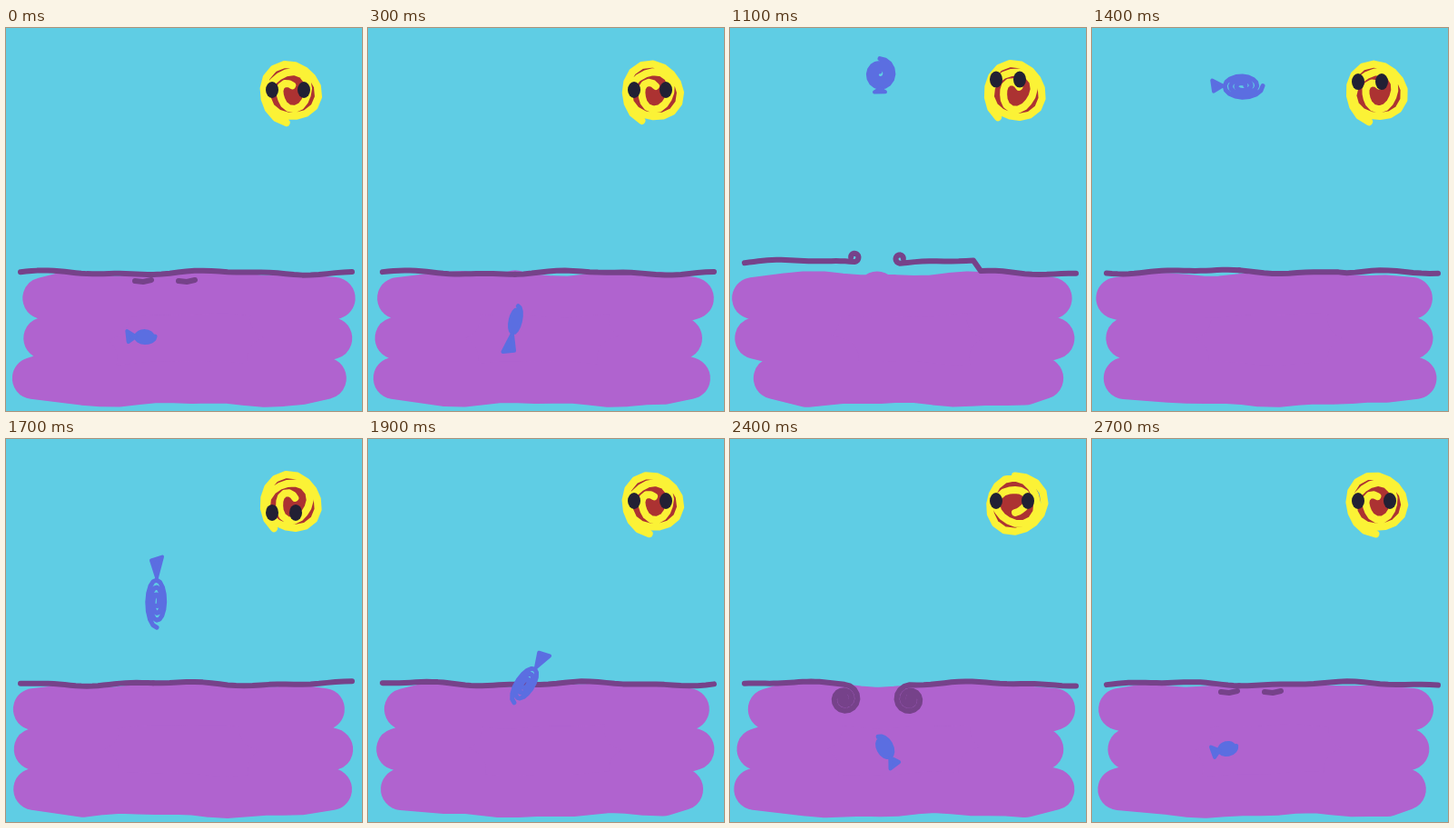
An HTML page with a canvas that plays this animation: 392 by 421 pixels, repeating every 2800 ms.

```html
<!DOCTYPE html>
<html>
<head>
<meta charset="utf-8">
<style>
  html, body { margin: 0; height: 100%; overflow: hidden; background: #5fcde4; }
  canvas { display: block; }
</style>
</head>
<body>
<canvas id="stage" width="392" height="421"></canvas>
<script>
const ctx = document.getElementById('stage').getContext('2d');
const SKY = '#5fcde4', SEA = '#b063cf', WAVE = '#76428a', FISH = '#5b6ee1';
const YELLOW = '#fbf236', RED = '#ac3232', EYE = '#222034';
const STEP = 100, STEPS = 28, TURN = Math.PI * 2;
const LEAP_OUT = 7, APEX = 12, SPLASH_X = 162, WATER = 269;

// Fish: step, x, heading in degrees, half length, half width
const swim = [
  [0, 153, 0, 13, 9], [3, 162, -78, 18, 8], [7, 170, -90, 21, 10], [11, 165, -90, 19, 18],
  [17, 166, 90, 30, 13], [22, 184, 170, 18, 11], [27, 149, 345, 12, 9], [28, 153, 360, 13, 9]
];

const rand = seed => Math.abs(Math.sin(seed * 12.9898 + 4.1) * 43758.5453) % 1;
const bell = (x, center, spread) => Math.exp(-(((x - center) / spread) ** 2));

// Uneven hand-drawn height along x, redrawn on every step
const wander = (x, seed, size) =>
  size * (Math.sin(x / 31 + rand(seed) * TURN) + 0.5 * Math.sin(x / 13 + rand(seed + 0.5) * TURN));

function brush(points, color, width, fill = false) {
  ctx.beginPath();
  points.forEach(([x, y]) => ctx.lineTo(x, y));
  ctx.fillStyle = ctx.strokeStyle = color;
  ctx.lineWidth = width;
  if (fill) {
    ctx.closePath();
    ctx.fill();
  }
  ctx.stroke();
}

function oval(x, y, rx, ry, color) {
  ctx.fillStyle = color;
  ctx.beginPath();
  ctx.ellipse(x, y, rx, ry, 0, 0, TURN);
  ctx.fill();
}

// Spiral of n points; radius(t) for t from 0 to 1
function spiral(turns, radius, place) {
  const n = Math.ceil(turns * 16);
  return Array.from({ length: n + 1 }, (_, i) => {
    const a = i / n * turns * TURN, r = radius(i / n);
    return place(Math.cos(a) * r, Math.sin(a) * r);
  });
}

function fishAt(step) {
  const i = swim.findIndex(key => key[0] > step), a = swim[i - 1], b = swim[i];
  const k = (step - a[0]) / (b[0] - a[0]);
  const [, x, heading, length, width] = a.map((v, n) => v + (b[n] - v) * k);
  const y = 48 + 292 * (1 - Math.exp(-((Math.abs(step - APEX) / 6.1) ** 2.6)));
  return { x, y, heading, length, width };
}

// Three rows of fat brush strokes with ragged ends
function drawSea(step) {
  const left = row => 24 + 28 * rand(step * 7 + row);
  const right = row => 366 - 22 * rand(step * 7 + row + 3);
  const rowY = row => 297 + row * 44;
  const points = [[left(0), rowY(0)]];
  for (let x = 62; x < 340; x += 20) {
    const y = 293 + wander(x, step, 2);
    points.push([x, y]);
    if (x === SPLASH_X) points.push([x, y - 39 * bell(step, LEAP_OUT, 2.6)], [x, y]);
  }
  for (let row = 0; row < 3; row++) {
    points.push([right(row), rowY(row)]);
    if (row < 2) points.push([right(row) - 70, rowY(row) + 22]);
  }
  for (let x = 325; x > 70; x -= 20) points.push([x, 391 + wander(x, step + 40, 2)]);
  for (let row = 2; row >= 0; row--) {
    points.push([left(row), rowY(row)]);
    if (row > 0) points.push([left(row) + 70, rowY(row) - 22]);
  }
  brush(points, SEA, 46, true);
}

// The surface tears open and curls: upwards on the way out, downwards on the way in
function drawWaves(step) {
  const out = step >= 6 && step <= 13, back = step >= 20 && step <= 24;
  const up = out ? 1 : -1;
  const size = out ? Math.max(1, 14 - 2.2 * (step - LEAP_OUT)) : 16;
  const turns = out ? 0.75 : 0.7 * (step - 19);
  const lift = 12 * bell(step, 11, 2);
  const height = x => WATER - lift * (x < 275) + wander(x, step + 80, 1.8);

  for (const side of [-1, 1]) {
    const open = out || back;
    const end = open ? SPLASH_X + side * (20 + size) : SPLASH_X;
    const start = side < 0 ? 16 : 381;
    const line = Array.from({ length: 25 }, (_, i) => {
      const x = start + (end - start) * i / 24;
      return [x, height(x)];
    });
    if (open) line.push(...spiral(turns, t => size * (1 - 0.4 * turns * t),
      (c, s) => [end - side * s, height(end) + up * (c - size)]));
    brush(line, WAVE, 6);
  }
  if (step > 24 || step < 2)
    for (const x of [142, 190])
      brush([[x, 278], [x + 9, 279], [x + 18, 277]], WAVE, 6);
}

// A scribble that closes up when small and leaves gaps when large
function drawFish({ x, y, heading, length, width }) {
  const tail = 15 * Math.max(0, length / width - 1);
  ctx.save();
  ctx.translate(x, y);
  ctx.rotate(heading * Math.PI / 180);
  brush(spiral(3, t => 1 - t * 0.85, (c, s) => [c * (length - 2), s * (width - 2)]), FISH, 5);
  if (tail) brush([[3 - length, 0], [-length - tail, -6], [-length - tail * 0.8, 6]], FISH, 4, true);
  ctx.restore();
}

// The eyes follow the fish while it is in the air
function drawSun(step, fish) {
  const airborne = fish.y < 240;
  const phase = rand(step + 120) * TURN;
  oval(314, 71, 28, 29, RED);
  ctx.save();
  ctx.translate(314, 71);
  ctx.rotate(phase);
  brush(spiral(2.5, t => 32 - 23 * t ** 1.7 + 1.5 * Math.sin(t * 40 + phase), (x, y) => [x, y]), YELLOW, 8);
  ctx.restore();
  const lookY = airborne ? 57 + (fish.y - 53) * 0.19 : 68;
  oval(293, lookY, 7, 9, EYE);
  oval(airborne ? 319 : 328, lookY, 7, 9, EYE);
}

function draw(step) {
  const fish = fishAt(step);
  ctx.lineCap = ctx.lineJoin = 'round';
  ctx.fillStyle = SKY;
  ctx.fillRect(0, 0, 392, 421);
  drawSea(step);
  drawWaves(step);
  drawFish(fish);
  drawSun(step, fish);
}

const start = performance.now();
function tick() {
  draw(Math.floor((performance.now() - start) / STEP) % STEPS);
  requestAnimationFrame(tick);
}
tick();
</script>
</body>
</html>
```
